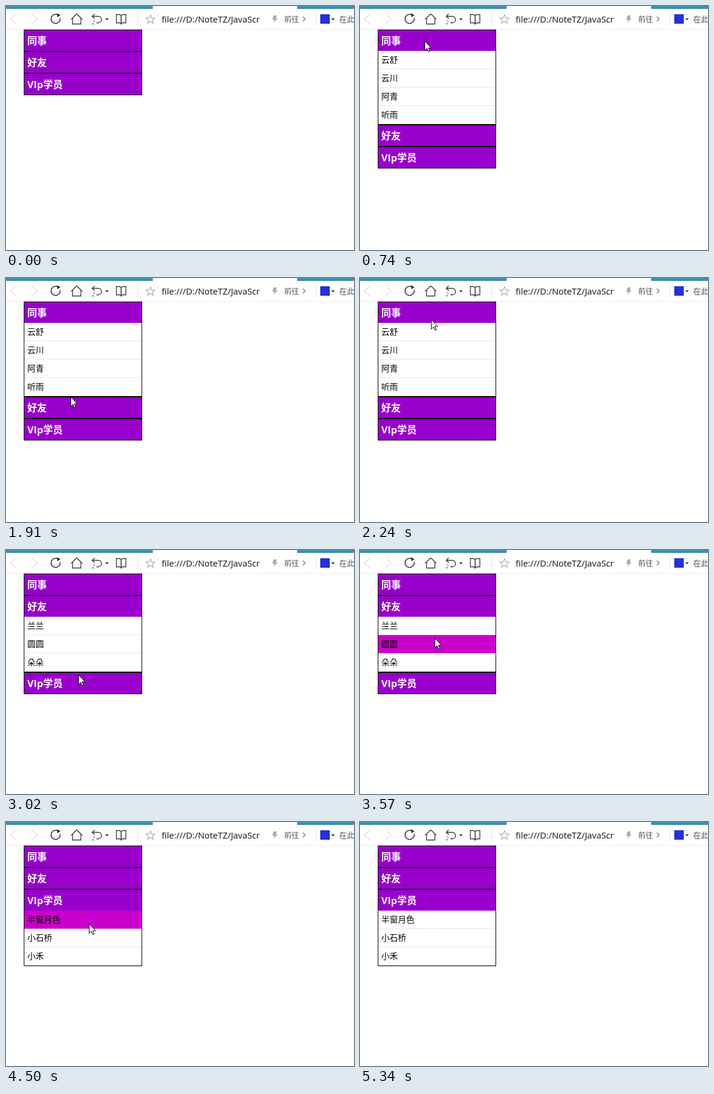
Animation, 588 px wide and 413 px high, one loop 6080 ms. Source, as an HTML page with a canvas:

```html
<!DOCTYPE html>
<html lang="zh-CN">
<head>
<meta charset="utf-8">
<title>好友列表</title>
<style>
  html, body { margin: 0; width: 588px; height: 413px; overflow: hidden; background: #fff; }
  canvas { display: block; }
</style>
</head>
<body>
<canvas id="stage" width="588" height="413"></canvas>
<script>
const ctx = document.getElementById('stage').getContext('2d');
const LOOP = 6080, TICK = 75;
const FONT = '"Open Sans", "Noto Sans CJK SC", "Noto Sans CJK", sans-serif';
const DARK = '#333', PALE = '#e6d9d5', ROSE = '#bda3a0';
const LEFT = 30, WIDTH = 200, HEAD = 37, ROW = 31;

// Each group opens when it is clicked, which closes the others
const groups = [
  { title: '同事', click: 740, names: ['云舒', '云川', '阿青', '听雨'] },
  { title: '好友', click: 3020, names: ['兰兰', '圆圆', '朵朵'] },
  { title: 'VIp学员', click: 4200, names: ['半窗月色', '小石桥', '小禾'] }
];

// Straight pointer strokes: the first and last tick in ms, and where they lead
const entry = { x: 547, y: 462 };
const strokes = [
  { from: 70, to: 420, x: 109, y: 58 },
  { from: 740, to: 1210, x: 110, y: 68 },
  { from: 1380, to: 1530, x: 102, y: 114 },
  { from: 1605, to: 1910, x: 109, y: 201 },
  { from: 1990, to: 2240, x: 120, y: 70 },
  { from: 2410, to: 2700, x: 122, y: 211 },
  { from: 3190, to: 3340, x: 125, y: 128 },
  { from: 3570, to: 3870, x: 132, y: 233 },
  { from: 4275, to: 4500, x: 140, y: 172 },
  { from: 4660, to: 4735, x: 144, y: 228 },
  { from: 4810, to: 5270, x: 518, y: 407 }
];
const EXIT = 5340;

function pointerAt(t) {
  if (t < strokes[0].from || t >= EXIT) return null;
  let { x, y } = entry;
  for (const s of strokes) {
    if (t < s.from) break;
    const gaps = Math.round((s.to - s.from) / TICK);
    const done = Math.min(gaps, Math.floor((t - s.from) / (s.to - s.from) * gaps + 1e-6));
    const p = (done + 1) / (gaps + 1);
    x += (s.x - x) * p;
    y += (s.y - y) * p;
  }
  return { x: Math.round(x), y: Math.round(y) };
}

function rect(x, y, w, h, color) {
  ctx.fillStyle = color;
  ctx.fillRect(x, y, w, h);
}

function text(str, x, midY, size, color, weight = 400) {
  ctx.font = `${weight} ${size}px ${FONT}`;
  ctx.fillStyle = color;
  ctx.fillText(str, x, Math.round(midY + size * 0.38));
}

function stroke(d, color, width = 1.3) {
  ctx.strokeStyle = color;
  ctx.lineWidth = width;
  ctx.stroke(new Path2D(d));
}

function fill(d, color) {
  ctx.fillStyle = color;
  ctx.fill(new Path2D(d));
}

// Angle bracket with its point at x, opening by dx
function chevron(x, dx, half, color) {
  stroke(`M${x + dx} ${22 - half}L${x} 22L${x + dx} ${22 + half}`, color, 1.2);
}

function caret(x) {
  fill(`M${x - 3} 21h6l-3 3.2Z`, DARK);
}

function star(x, y, r) {
  const points = Array.from({ length: 10 }, (_, i) => {
    const a = (i / 5 - 0.5) * Math.PI, d = i % 2 ? r * 0.44 : r;
    return `${x + d * Math.cos(a)} ${y + d * Math.sin(a)}`;
  });
  stroke(`M${points.join('L')}Z`, ROSE, 1.2);
}

function drawToolbar() {
  rect(0, 0, 588, 5, '#3f90b0');
  rect(248, 0, 244, 5, '#fff');
  rect(0, 39, 588, 1, '#e9e9e9');
  for (const x of [222, 523]) rect(x, 11, 1, 22, '#e4dfdf');

  chevron(7.5, 8.5, 8, PALE);
  chevron(52.5, -8.5, 8, PALE);
  stroke('M88.5 15.6A7.7 7.7 0 1 0 91.5 20.5', DARK, 1.5);
  fill('M86 12l6 3.5l-5 3.5Z', DARK);
  stroke('M110 22.5l9.5-9l9.5 9M112.5 20.5v10h14v-10', DARK);
  stroke('M150 13.5l-4.5 4l4.5 4M146 17.5h10a5.4 5.4 0 0 1 0 11h-3', DARK);
  text('2', 145, 27.5, 9, '#2f6fc4');
  caret(170.5);
  for (const s of [-1, 1]) {
    stroke(`M194.5 16q${s * 1.5}-1.5 ${s * 4}-1.5h${s * 4}v14h${s * -4.5}q${s * -2.5} 0 ${s * -3.5} 1.5Z`, DARK);
  }
  star(244, 22.8, 8);
  text('file:///D:/NoteTZ/JavaScr', 263, 22.5, 14.8, '#111');
  fill('M452 16h6l-2.5 4.5h3.5l-7.5 8.5l2-6h-3.5Z', ROSE);
  text('前往', 470, 22.5, 12.5, '#555');
  chevron(505.5, -4, 4, '#777');
  rect(531, 14, 16, 16, '#2231d8');
  caret(552.5);
  text('在此', 563, 22.5, 13, '#555');
}

function drawRow(name, y, pointer) {
  const right = LEFT + WIDTH - 1;
  const hover = pointer && pointer.x > LEFT && pointer.x < right &&
    pointer.y >= y && pointer.y < y + ROW;
  rect(LEFT + 1, y, WIDTH - 2, ROW, hover ? '#cc00cc' : '#fff');
  ctx.setLineDash([1, 1]);
  stroke(`M${LEFT + 2} ${y + ROW - 0.5}H${right}`, '#ccc', 1);
  ctx.setLineDash([]);
  text(name, LEFT + 6, y + 15, 14, '#000');
}

function drawGroups(t, pointer) {
  const open = groups.filter(g => t >= g.click).pop();
  let top = 40;
  for (const group of groups) {
    const names = group === open ? group.names : [];
    const height = HEAD + names.length * ROW;
    rect(LEFT, top, WIDTH, height, '#000');
    rect(LEFT + 1, top + 1, WIDTH - 2, HEAD - 2, '#9900cc');
    text(group.title, LEFT + 6, top + 19, 16.5, '#fff', 700);
    names.forEach((name, i) => drawRow(name, top + HEAD - 1 + i * ROW, pointer));
    top += height;
  }
}

function drawPointer({ x, y }) {
  const arrow = 'M.5 .5v16l3.7-3.5l2.6 5.5l2.2-1l-2.4-5.5h4.9Z';
  ctx.save();
  ctx.translate(x, y);
  fill(arrow, '#fff');
  stroke(arrow, '#000', 1);
  ctx.restore();
}

function draw(t) {
  const pointer = pointerAt(t);
  rect(0, 0, 588, 413, '#fff');
  drawToolbar();
  drawGroups(t, pointer);
  if (pointer) drawPointer(pointer);
}

const begin = performance.now();
function frame() {
  draw((performance.now() - begin) % LOOP);
  requestAnimationFrame(frame);
}
frame();
</script>
</body>
</html>
```
